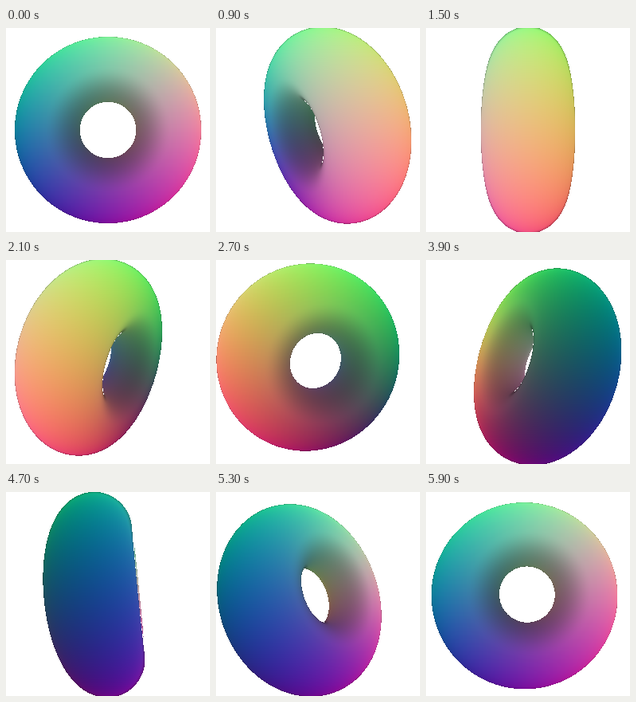
Recreate the animation shown at these times as an HTML page with a canvas. Size 256 by 256 pixels, loop 6000 ms.

```html
<!DOCTYPE html>
<html lang="en">
<head>
<meta charset="utf-8">
<title>Torus</title>
<style>
  html, body { margin: 0; width: 100%; height: 100%; overflow: hidden; background: #fff; }
  canvas { display: block; width: 256px; height: 256px; }
</style>
</head>
<body>
<canvas id="stage" width="256" height="256"></canvas>
<script>
const SIZE = 256, LOOP = 6000, STEPS = 60;
const MAJOR = 1, MINOR = 0.515, DIST = 3;
const FOCAL = SIZE / 2 / Math.tan(Math.PI / 6);
const MAX_TILT = 0.5;

const ctx = document.getElementById('stage').getContext('2d');
const image = ctx.createImageData(SIZE, SIZE);
const pixels = new Uint32Array(image.data.buffer);

const smooth = (a, b, v) => {
  const k = Math.min(1, Math.max(0, (v - a) / (b - a)));
  return k * k * (3 - 2 * k);
};
const byte = v => Math.max(0, Math.min(255, Math.round(v * 255)));

// Camera basis in object space; the eye swings up and down as it circles.
function camera(angle) {
  const tilt = MAX_TILT * Math.sin(angle);
  const s = Math.sin(angle), c = Math.cos(angle);
  const st = Math.sin(tilt), ct = Math.cos(tilt);
  return {
    right: [c, 0, -s],
    up: [-st * s, ct, -st * c],
    back: [ct * s, st, ct * c]
  };
}

// Sphere tracing; returns the distance along the ray, or -1 on a miss.
function trace(eye, dx, dy, dz) {
  let t = 1.3;
  for (let i = 0; i < 70 && t < 4.8; i++) {
    const x = eye[0] + dx * t, y = eye[1] + dy * t, z = eye[2] + dz * t;
    const ring = Math.sqrt(x * x + y * y) - MAJOR;
    const d = Math.sqrt(ring * ring + z * z) - MINOR;
    if (d < 0.002) return t;
    t += d;
  }
  return -1;
}

// Colour is the surface position, darker inside the hole and along the outline.
function shade(x, y, z, dx, dy, dz) {
  const len = Math.hypot(x, y), ring = len - MAJOR;
  const tube = Math.hypot(ring, z);
  const facing = -(ring / tube * (x * dx + y * dy) / len + z / tube * dz);
  const light = (1 - 0.28 * smooth(0.2, 1, -ring / tube))
    * (0.7 + 0.3 * smooth(0, 0.2, facing));
  const mix = p => byte((0.5 + 0.32 * p) * light);
  return (255 << 24 | mix(z) << 16 | mix(y) << 8 | mix(x)) >>> 0;
}

function draw(step) {
  const { right, up, back } = camera(step / STEPS * 2 * Math.PI);
  const eye = back.map(v => v * DIST);
  for (let row = 0, i = 0; row < SIZE; row++) {
    const v = (SIZE / 2 - row - 0.5) / FOCAL;
    for (let col = 0; col < SIZE; col++, i++) {
      const u = (col + 0.5 - SIZE / 2) / FOCAL;
      const k = 1 / Math.sqrt(1 + u * u + v * v);
      const dx = (right[0] * u + up[0] * v - back[0]) * k;
      const dy = (right[1] * u + up[1] * v - back[1]) * k;
      const dz = (right[2] * u + up[2] * v - back[2]) * k;
      const t = trace(eye, dx, dy, dz);
      pixels[i] = t < 0 ? 0xffffffff
        : shade(eye[0] + dx * t, eye[1] + dy * t, eye[2] + dz * t, dx, dy, dz);
    }
  }
  ctx.putImageData(image, 0, 0);
}

let shown = -1;
function tick() {
  const step = Math.floor(performance.now() % LOOP / LOOP * STEPS);
  if (step !== shown) draw(shown = step);
  requestAnimationFrame(tick);
}
tick();
</script>
</body>
</html>
```
